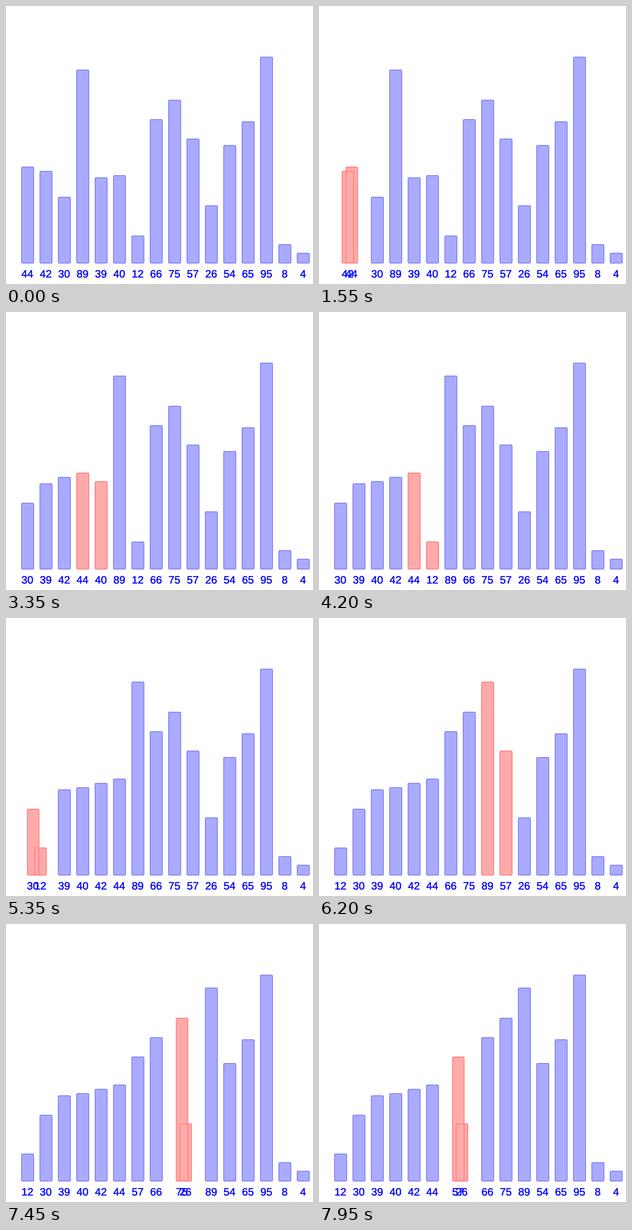
A matplotlib script that plays this animation: 568x516 px, repeating every 8 s.

```python
import matplotlib.pyplot as plt
from matplotlib.animation import FuncAnimation
from matplotlib.patches import FancyBboxPatch
from matplotlib.patheffects import withStroke

WIDTH, HEIGHT, DPI = 568, 516, 100
LOOP, STEP = 8000, 50
VALUES = [44, 42, 30, 89, 39, 40, 12, 66, 75, 57, 26, 54, 65, 95, 8, 4]

LEFT, PITCH, BAR_WIDTH, FLOOR = 28, 34, 24, 478
BLUE, BLUE_EDGE = "#aaaaff", "#8080f2"
RED, RED_EDGE = "#ffaaaa", "#ff7c7c"
LABEL = "#1010ff"

# Timing of the sort, in ms
FIRST_MOVE = 1476
COMPARE, MOVE, KEEP = 128, 122, 112.5


def build_stages():
    """Insertion sort as (start, order, compared column, start of the swap)."""
    order = VALUES[:]
    stages = [(0, order[:], None, None)]
    start, move_at = FIRST_MOVE, FIRST_MOVE
    for i in range(1, len(order)):
        for j in range(i - 1, -1, -1):
            swap = order[j] > order[j + 1]
            stages.append((start, order[:], j, move_at if swap else None))
            if not swap:
                start += KEEP
                move_at = start + COMPARE
                break
            order[j], order[j + 1] = order[j + 1], order[j]
            start = move_at + MOVE
            move_at = start + COMPARE
    return stages


STAGES = build_stages()

fig = plt.figure(figsize=(WIDTH / DPI, HEIGHT / DPI), dpi=DPI, facecolor="white")
ax = fig.add_axes([0, 0, 1, 1])
ax.set_xlim(0, WIDTH)
ax.set_ylim(HEIGHT, 0)
ax.axis("off")


class Bar:
    def __init__(self, value):
        self.top = FLOOR - 4 * value - 4
        self.fill = self.make_box(lw=0, zorder=1)
        self.outline = self.make_box(lw=1.5 * 72 / DPI, zorder=2, fc="none")
        self.text = ax.text(
            0, 504, str(value), color=LABEL, family="Liberation Sans",
            size=19.8 * 72 / DPI, ha="center", va="baseline", zorder=3,
            path_effects=[withStroke(linewidth=0.3, foreground=LABEL)])

    def make_box(self, **style):
        box = FancyBboxPatch((0, 0), BAR_WIDTH, 10,
                             boxstyle="round,pad=0,rounding_size=2", **style)
        return ax.add_patch(box)

    def place(self, x, width, active):
        inset = 0.75
        for box in (self.fill, self.outline):
            box.set_bounds(x + inset, self.top + inset,
                           width - 2 * inset, FLOOR - self.top - 2 * inset)
        self.fill.set_facecolor(RED if active else BLUE)
        self.outline.set_edgecolor(RED_EDGE if active else BLUE_EDGE)
        self.text.set_x(x + width / 2 - 0.4)


bars = {value: Bar(value) for value in VALUES}


def draw(frame):
    t = frame * STEP
    _, order, pair, move_at = [s for s in STAGES if s[0] <= t][-1]
    shift = 0
    if move_at is not None:
        shift = PITCH * min(1, max(0, (t - move_at) / MOVE))
    for column, value in enumerate(order):
        x, width = LEFT + PITCH * column, BAR_WIDTH
        active = pair is not None and column in (pair, pair + 1)
        if active and shift:
            x += 0.6 + (shift if column == pair else -shift)
            width = BAR_WIDTH - 1
        bars[value].place(x, width, active)
    return []


animation = FuncAnimation(fig, draw, frames=LOOP // STEP, interval=STEP,
                          repeat=True, repeat_delay=0, blit=False)
plt.show()
```
